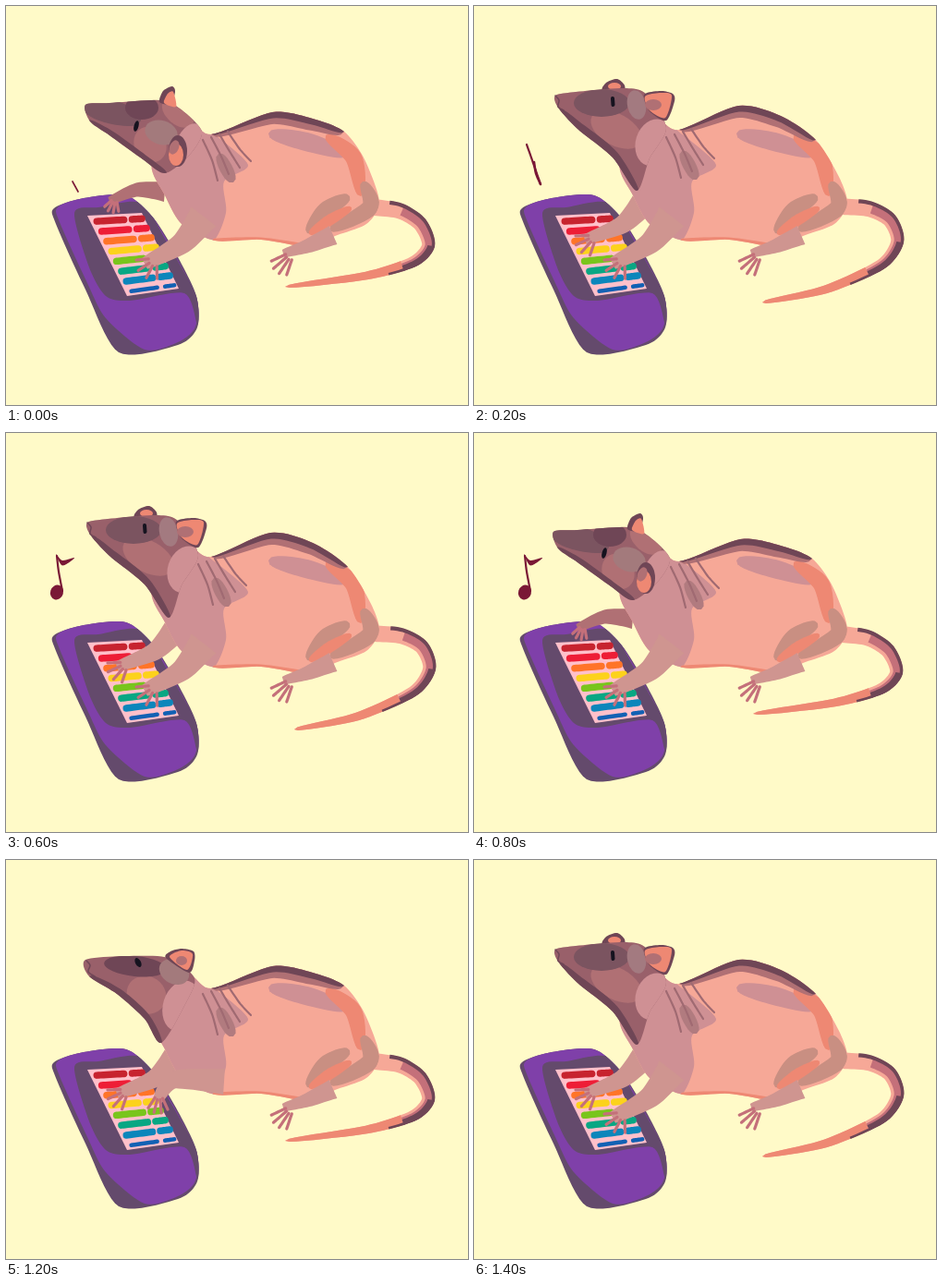
An HTML page with a canvas that plays this animation: 500x432 px, repeating every 1600 ms.

```html
<!DOCTYPE html>
<html lang="en">
<head>
<meta charset="utf-8">
<title>Rat at the keyboard</title>
<style>
html, body { margin: 0; width: 100%; height: 100%; overflow: hidden; background: #fffac8; }
canvas { display: block; width: 100vw; height: 100vh; }
</style>
</head>
<body>
<canvas id="stage" width="500" height="432"></canvas>
<script>
const ctx = document.getElementById('stage').getContext('2d');
const STEP = 200;
const C = {
  paper: '#fffac8', purple: '#7f40a9', shade: '#644a6c', pad: '#ffc0ca',
  skin: '#f6a897', coral: '#ee8873', mauve: '#cf9094', arm: '#cf9590',
  tan: '#c98f82', brown: '#b07074', muzzle: '#99606a', dark: '#6f4656',
  crown: '#7b5460', rose: '#c4707a', ink: '#7a1836', eye: '#15131f'
};
const mix = (a, b, t) => a + (b - a) * t;

// Width profiles along a ribbon, t from 0 to 1.
const swell = t => Math.sqrt(Math.sin(Math.PI * Math.min(1, t)));
const taper = t => Math.pow(1 - t, 0.4);
const limb = t => 1 - 0.62 * t;

// Smooth run of points through a few "x y" pairs.
function curve(text, closed) {
  const n = text.split(' ').map(Number), count = n.length / 2, out = [];
  const at = (i, axis) => {
    i = closed ? (i + count) % count : Math.max(0, Math.min(count - 1, i));
    return n[i * 2 + axis];
  };
  const spans = closed ? count : count - 1;
  for (let s = 0; s <= spans * 10; s++) {
    const i = Math.min(spans - 1, Math.floor(s / 10)), f = s / 10 - i;
    const blend = axis => {
      const b = at(i, axis), c = at(i + 1, axis);
      const u = 0.4 * (c - at(i - 1, axis)), v = 0.4 * (at(i + 2, axis) - b);
      return b + u * f + (3 * (c - b) - 2 * u - v) * f * f + (2 * (b - c) + u + v) * f ** 3;
    };
    out.push([blend(0), blend(1)]);
  }
  return out;
}
function trace(points) {
  ctx.beginPath();
  points.forEach(p => ctx.lineTo(...p));
}
function fill(color, text) {
  trace(curve(text, true));
  ctx.fillStyle = color;
  ctx.fill();
}
function line(color, width, text) {
  trace(curve(text));
  ctx.strokeStyle = color;
  ctx.lineWidth = width;
  ctx.stroke();
}
function oval(color, x, y, rx, ry, turn = 0) {
  ctx.fillStyle = color;
  ctx.beginPath();
  ctx.ellipse(x, y, rx, ry, turn, 0, Math.PI * 2);
  ctx.fill();
}
// Band along a curve; lo and hi are its sides as shares of the half width.
function ribbon(color, text, half, profile, from = 0, to = 1, lo = -1, hi = 1) {
  const p = curve(text), last = p.length - 1, left = [], right = [];
  for (let i = Math.round(from * last); i <= Math.round(to * last); i++) {
    const a = p[Math.max(0, i - 1)], b = p[Math.min(last, i + 1)];
    const dx = b[0] - a[0], dy = b[1] - a[1], w = half * profile(i / last) / Math.hypot(dx, dy);
    left.push([p[i][0] + dy * w * hi, p[i][1] - dx * w * hi]);
    right.unshift([p[i][0] + dy * w * lo, p[i][1] - dx * w * lo]);
  }
  trace(left.concat(right));
  ctx.fillStyle = color;
  ctx.fill();
}
// Filled shape whose markings stay inside it.
function shape(color, text, markings) {
  fill(color, text);
  ctx.save();
  trace(curve(text, true));
  ctx.clip();
  markings();
  ctx.restore();
}
function fan(x, y, angle, spread, length) {
  for (let i = 0; i < 4; i++) {
    const a = angle + spread * (i / 3 - 0.5);
    const r = length * (i % 3 ? 1 : 0.92), c = Math.cos(a), s = Math.sin(a);
    line(C.rose, 3.2, `${x + c * r * 0.4} ${y + s * r * 0.4} ${x + c * r} ${y + s * r}`);
  }
}

const KEYS = ['#c7232f', '#ee1d36', '#ff7428', '#fcd21c', '#79c51c', '#08a783', '#0c86bb', '#1261b4'];

function keyboard() {
  shape(C.shade, '52 219 84 208 130 205 160 230 186 272 206 314 207 348 186 367 122 375 86 307 54 236', () => {
    fill(C.purple, '56 218 84 206 140 203 204 310 205 347 186 364 150 372 108 338 88 300 58 234');
    fill(C.shade, '74 224 100 218 146 213 172 252 207 316 207 345 193 311 134 319 108 314 90 283');
  });
  trace([[88, 227], [147, 224], [187, 306], [131, 314]]);
  ctx.fillStyle = C.pad;
  ctx.fill();
  KEYS.forEach((color, i) => {
    const v = (i + 0.6) / 8;
    const x = u => mix(mix(88, 131, v), mix(147, 187, v), u);
    const y = u => mix(mix(227, 314, v), mix(224, 306, v), u);
    const key = (a, b) => line(color, i === 7 ? 4.5 : 7.5, `${x(a)} ${y(a)} ${x(b)} ${y(b)}`);
    key(0.12, 0.62);
    key(0.77, 0.95);
  });
}

function tail(path) {
  ribbon(C.skin, path, 9, taper);
  ribbon(C.rose, path, 9, taper, 0.18, 0.72, -0.5, 1);
  ribbon(C.coral, path, 9, taper, 0.72, 1);
  ribbon(C.dark, path, 9, taper, 0.1, 0.76, 0.55, 1.05);
  ribbon(C.dark, path, 9, taper, 0.5, 0.72, -0.1, 1);
}

function wrinkles(dx, dy) {
  ribbon('#b17b7f', `${230 + dx} ${160 + dy} ${246 + dx} ${191 + dy}`, 7, swell);
  for (let i = 0; i < 4; i++) {
    const x = 213 + 9 * i + dx, y = 145 - 3 * i + dy;
    line('#a06a72', 2.2, `${x} ${y} ${x + 10 + i} ${y + 22 - i} ${x + 16 + 3 * i} ${y + 44 - 4 * i}`);
  }
}

function body(ridge, flank, dx, dy) {
  const belly = '390 236 356 249 330 261 276 253 226 254 190 236 172 205 158 170';
  shape(C.skin, `196 125 ${ridge} ${flank} ${belly}`, () => {
    ribbon(C.mauve, '284 138 325 147 370 161', 10, swell);
    ribbon(C.coral, '346 140 376 164 384 206', 9, swell);
    ribbon(C.tan, '386 190 394 218 350 243', 9, swell);
    ribbon(C.tan, '372 206 346 221 326 246', 9, swell);
    ribbon(C.coral, '374 218 350 232 328 247', 6, swell);
    fill(C.mauve, '150 165 200 124 224 138 262 172 236 190 238 224 222 256 185 240');
    ribbon(C.brown, ridge, 14, swell);
    ribbon(C.dark, ridge, 7, swell);
    line(C.coral, 5, '226 254 276 253 330 261');
  });
  wrinkles(dx, dy);
  ribbon(C.arm, '354 248 326 260 300 268', 11, limb);
  fan(313, 264, 2.3, 0.8, 31);
}
function bodyLow() {
  tail('398 218 426 222 448 236 457 259 440 277 390 292 302 304');
  body('222 139 288 115 332 122 366 136', '388 166 404 212', 0, 0);
}
function bodyHigh() {
  tail('398 217 428 220 450 232 458 255 440 280 380 307 312 321');
  body('222 134 286 108 332 119 370 145', '395 185 404 214', -5, -3);
}

function headDown() {
  shape(C.muzzle, '86 107 112 105 166 102 188 111 212 136 198 162 172 181 148 166 112 140 91 125', () => {
    ribbon(C.crown, '84 108 112 114 146 124', 13, swell);
    oval(C.brown, 156, 150, 17, 20, -0.5);
    oval(C.brown, 186, 116, 20, 12, 0.7);
    oval(C.dark, 147, 110, 18, 13);
    oval('#a37a7c', 168, 137, 18, 13, 0.3);
    oval(C.mauve, 198, 150, 14, 24, 0.4);
    ribbon(C.dark, '88 124 112 140 148 166 174 182', 6, swell);
  });
  fill(C.dark, '166 104 170 92 180 87 183 93 178 106');
  fill(C.coral, '171 105 175 95 181 93 184 109');
  oval(C.dark, 186, 157, 10, 17);
  oval(C.coral, 184, 161, 8, 12);
  oval(C.brown, 182, 153, 5, 8, 0.4);
  oval(C.eye, 141, 130, 2.5, 6, 0.25);
}
function headLevel() {
  shape(C.muzzle, '86 108 130 104 176 106 204 128 194 156 168 198 150 172 120 145 90 126', () => {
    oval(C.brown, 152, 146, 22, 20, 0.6);
    oval(C.mauve, 190, 158, 20, 28, 0.3);
    oval(C.dark, 140, 115, 34, 11, 0.1);
    oval('#a37a7c', 182, 121, 17, 13, 0.5);
    ribbon(C.dark, '90 126 120 145 150 172 168 200', 7, swell);
  });
  fill(C.dark, '173 106 178 99 190 96 203 99 204 109 198 122');
  fill(C.coral, '177 105 190 98 202 102 196 119');
  oval(C.brown, 190, 109, 6, 5);
  oval(C.eye, 143, 111, 3, 5.3, -0.5);
  line(C.dark, 1.5, '87 109 91 114 89 121 96 126');
}
function headUp() {
  fill(C.dark, '139 92 143 83 155 79 163 86 161 94');
  oval(C.coral, 152, 87, 7, 4);
  shape(C.muzzle, '88 97 110 93 162 89 186 95 208 132 190 165 176 200 150 164 112 133 91 110', () => {
    oval(C.brown, 154, 134, 30, 17, 0.5);
    oval(C.mauve, 195, 148, 20, 26, 0.3);
    oval(C.crown, 138, 105, 30, 15);
    oval('#a37a80', 176, 107, 10, 16, -0.2);
    ribbon(C.dark, '91 112 112 133 150 164 178 204', 8, swell);
  });
  fill(C.dark, '184 96 202 92 215 95 217 103 208 124 190 114');
  fill(C.coral, '185 98 202 94 214 97 207 121 190 113');
  oval(C.brown, 194, 107, 9, 6);
  line(C.eye, 4, '150 100 150.5 107');
  line(C.dark, 1.5, '88 97 92 102 91 109 97 113');
}

function arm(color, path, width, ...hand) {
  ribbon(color, path, width, limb);
  fan(...hand);
}
const farRaised = () => arm(C.brown, '172 201 142 199 112 211', 11, 119, 206, 1.9, 1, 18);
const farPlaced = () => arm(C.arm, '182 215 160 237 120 253', 14, 133, 248, 2.5, 1.2, 25);
const nearPlaced = () => arm(C.arm, '214 228 190 257 150 279', 17, 163, 273, 2.3, 1.5, 24);
const nearBent = () => arm(C.arm, '236 240 182 238 164 260', 14, 166, 250, 1.65, 1, 24);

const poses = {
  down: [farRaised, bodyLow, headDown, nearPlaced],
  up: [farPlaced, bodyHigh, headUp, nearPlaced],
  level: [farPlaced, bodyLow, headLevel, nearBent]
};

const marks = {
  spark() { line(C.ink, 1.7, '72 190 78 201'); },
  streak() {
    line(C.ink, 2.2, '57 150 63 167 72 193');
    line(C.ink, 2.6, '65 169 67 181 72 193');
  },
  note() {
    oval(C.ink, 55, 172.5, 7, 8, 0.3);
    line(C.ink, 2.2, '55 133 57 150 61 171');
    fill(C.ink, '54 131 61 138 74 135 67 141 60 143');
  },
  burst() {
    for (let i = 0; i < 15; i++) {
      const a = i / 15 * Math.PI * 2 - 0.5, x = Math.cos(a), y = Math.sin(a);
      const r = 18 + i % 3, end = r + 4 + i * 2 % 3;
      line(i % 3 ? '#b98a78' : '#92505a', 1.3,
        `${59 + x * r} ${159 + y * r} ${59 + x * end} ${159 + y * end}`);
    }
  },
  none() {}
};

const beats = ['down spark', 'up streak', 'level note', 'up note',
  'down note', 'up burst', 'level none', 'up none'].map(s => s.split(' '));

function draw(beat) {
  const [pose, mark] = beats[beat];
  ctx.fillStyle = C.paper;
  ctx.fillRect(0, 0, 500, 432);
  ctx.lineCap = ctx.lineJoin = 'round';
  keyboard();
  poses[pose].forEach(part => part());
  marks[mark]();
}

let start = null, shown = -1;
function tick(now) {
  if (start === null) start = now;
  const beat = Math.floor((now - start) / STEP) % beats.length;
  if (beat !== shown) draw(shown = beat);
  requestAnimationFrame(tick);
}
draw(0);
requestAnimationFrame(tick);
</script>
</body>
</html>
```
